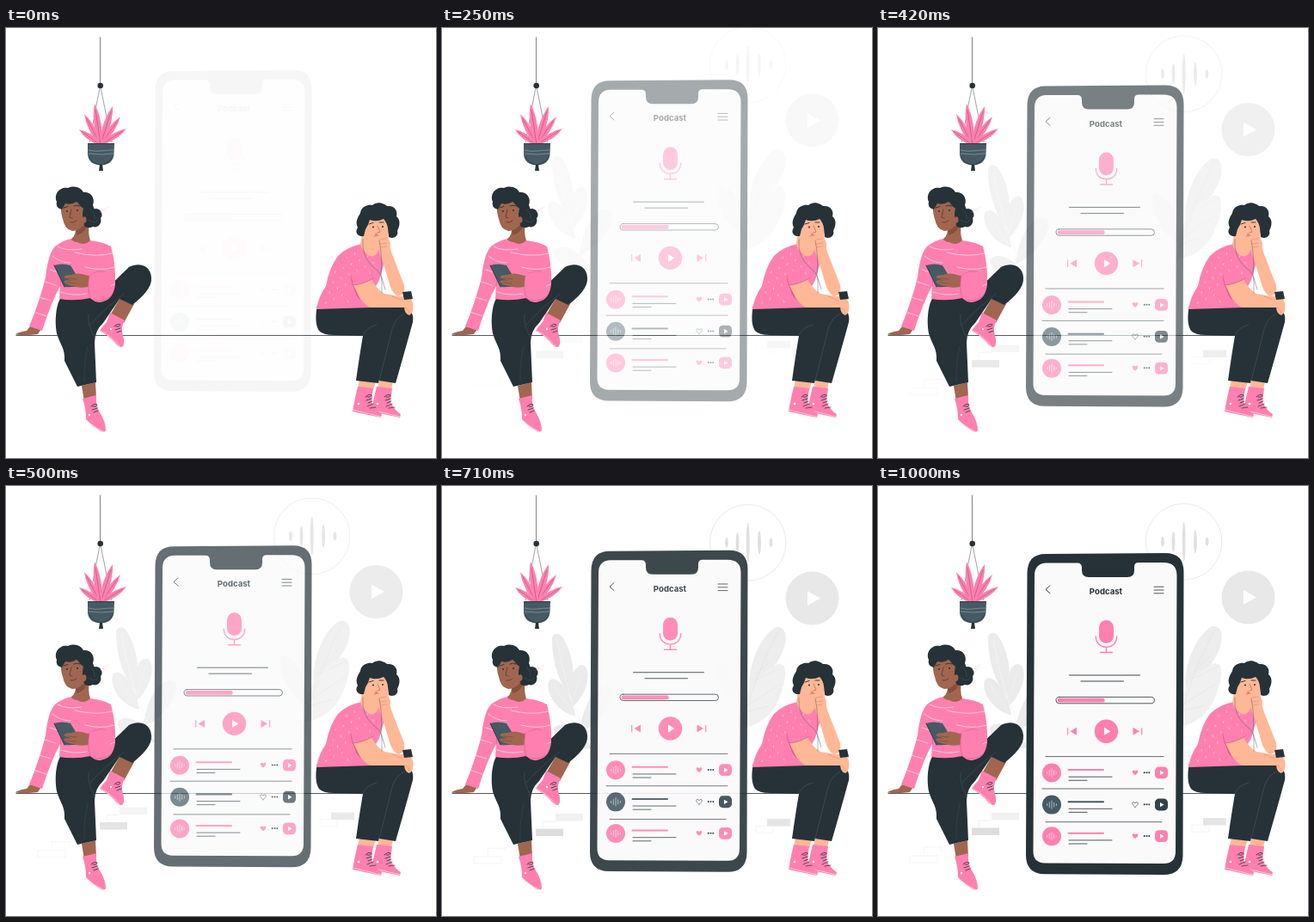
An HTML page with a canvas that plays this animation: 500x500 px, repeating every 1040 ms.

```html
<!DOCTYPE html>
<html lang="en">
<head>
<meta charset="utf-8">
<title>Podcast</title>
<style>
html, body { margin: 0; width: 100%; height: 100%; overflow: hidden; background: #fff; }
canvas { display: block; width: 500px; height: 500px; }
</style>
</head>
<body>
<canvas id="stage"></canvas>
<script>
const SIZE = 500, LOOP = 1040, RATE = 24, DROP = 30;
const PINK = '#ff80b0', DARK = '#263238', SLATE = '#455a64', BROWN = '#a06650',
  SKIN = '#ffb895', PALE = '#ebebeb', WHITE = '#fff', SCREEN = '#fafafa', SHADE = '#d95f8f';
const dpr = window.devicePixelRatio || 1;

function makeCtx(canvas) {
  canvas.width = canvas.height = SIZE * dpr;
  const c = canvas.getContext('2d');
  c.lineCap = c.lineJoin = 'round';
  return c;
}
const stage = makeCtx(document.getElementById('stage'));
const layer = makeCtx(document.createElement('canvas'));
let g = stage;

function fill(d, color) {
  g.fillStyle = color;
  g.fill(new Path2D(d));
}
function line(d, color = DARK, w = 0.8) {
  g.strokeStyle = color;
  g.lineWidth = w;
  g.stroke(new Path2D(d));
}
function oval(x, y, rx, ry, color) {
  g.beginPath();
  g.ellipse(x, y, rx, ry, 0, 0, Math.PI * 2);
  g.fillStyle = color;
  g.fill();
}
const dot = (x, y, r, color) => oval(x, y, r, r, color);
function box(x, y, w, h, r, color, stroke) {
  g.beginPath();
  g.roundRect(x, y, w, h, r);
  if (color) { g.fillStyle = color; g.fill(); }
  if (stroke) { g.strokeStyle = stroke; g.lineWidth = 0.8; g.stroke(); }
}
const tri = (x, y, w, h, color) => fill(`M${x} ${y - h}L${x + w} ${y}L${x} ${y + h}Z`, color);

// Cubic bezier timing, solved by bisection
function bezier(x1, y1, x2, y2) {
  const at = (a, b, s) => 3 * (1 - s) * (1 - s) * s * a + 3 * (1 - s) * s * s * b + s * s * s;
  return t => {
    if (t <= 0) return 0;
    if (t >= 1) return 1;
    let lo = 0, hi = 1;
    for (let i = 0; i < 30; i++) {
      const mid = (lo + hi) / 2;
      if (at(x1, x2, mid) < t) lo = mid; else hi = mid;
    }
    return at(y1, y2, lo);
  };
}
const easeOut = bezier(0, 0, 0.58, 1);
const spring = bezier(0.36, -0.01, 0.5, 1.38);

function drawBack() {
  g.beginPath();
  g.arc(355.7, 64.8, 44.3, 0, Math.PI * 2);
  g.strokeStyle = '#e4e4e4';
  g.lineWidth = 0.8;
  g.stroke();
  [[331, 6], [343.5, 12], [355.7, 23], [369, 13.5], [382.5, 5]]
    .forEach(([x, h]) => oval(x, 64.8, 1.9, h, '#e0e0e0'));
  dot(430.5, 129.5, 31, '#e8e8e8');
  tri(425, 129.5, 15, 8.5, WHITE);

  // Left foliage
  fill('M128 178C127 169 138 167 143 180C152 196 156 220 151 246C138 232 128 205 128 178Z', PALE);
  fill('M151 254C146 230 152 206 164 207C174 211 171 238 152 256Z', PALE);
  fill('M154 266C134 262 120 240 124 226C133 215 151 240 155 266Z', PALE);
  fill('M160 284C164 250 182 226 197 234C203 247 186 274 161 286Z', PALE);
  fill('M174 304C152 309 130 296 130 281C138 270 162 280 174 304Z', PALE);
  line('M134 178Q143 242 176 304', '#f4f4f4', 0.8);
  line('M151 251L163 214M152 263L128 228M161 280L191 241M171 301L135 282', '#f4f4f4', 0.6);

  // Right foliage
  fill('M358 237C354 204 374 169 389 163C402 162 403 180 393 198C383 216 369 229 358 237Z', '#ededed');
  fill('M350 280C344 245 365 217 391 206C402 205 401 223 394 240C386 266 367 278 350 280Z', '#f0f0f0');
  fill('M350 262C326 250 315 219 320 204C337 200 352 233 350 262Z', '#f2f2f2');
  line('M392 167Q368 205 340 306', '#dedede', 0.5);
  line('M366 218L391 193M364 225L397 209M354 255L394 229M352 262L380 255', '#e0e0e0', 0.5);

  // Bricks
  box(109, 397.5, 32, 8.5, 0, '#dedede');
  box(132, 380, 32, 8.5, 0, '#f1f1f1');
  line('M131 389H117V397', '#ededed');
  line('M69 429V438H37V430H69M53 428V420H74M74 420V424', '#f2f2f2');
  box(378, 386, 27, 8.5, 0, '#e5e5e5');
  line('M385 394V402H365V394H377', '#f1f1f1');
}

function wave(x, y) {
  [1, 3, 4.6, 2.4, 1].forEach((h, i) => {
    const u = x - 5.4 + i * 2.7;
    line(`M${u} ${y - h}V${y + h}`, '#ffffffcc', 0.7);
  });
}

function drawRow(y, color, button, liked) {
  dot(202, y, 11, color);
  wave(202, y);
  line(`M221.5 ${y - 3.4}H262`, color, 2);
  line(`M222 ${y + 4.7}H272M222 ${y + 8.8}H243`, DARK, 0.8);
  const heart = `M299 ${y + 2.8}C295 ${y} 295 ${y - 3} 297 ${y - 3}Q298.5 ${y - 3} 299 ${y - 1.6}`
    + `Q299.5 ${y - 3} 301 ${y - 3}C303 ${y - 3} 303 ${y} 299 ${y + 2.8}Z`;
  if (liked) fill(heart, color); else line(heart, color, 0.7);
  [309.7, 312.5, 315.3].forEach(x => dot(x, y - 0.3, 1, DARK));
  box(322, y - 7, 15, 13.8, 4.5, button);
  tri(328, y, 4.5, 2.7, WHITE);
}

function drawPhone() {
  fill('M173.5 101Q174 79 195 79L334 78Q355.5 78 355.5 100L354.5 430Q354 452 332 452L194 451.3Q172 451 172 429Z', DARK);
  fill('M182 104Q182 90 196 89.5H232Q237 89.5 237 95V98Q237 106 245 106H290Q298 106 298 98V94Q298 89 303 89H332Q347.5 89 347.5 104L346 425Q346 439 332 439L194 438.5Q180.5 438 180.5 425Z', SCREEN);

  line('M200 115.8L195 120.3L200 124.8', DARK, 0.9);
  g.fillStyle = DARK;
  g.font = '700 9.6px Inter, sans-serif';
  g.textAlign = 'center';
  g.fillText('Podcast', 265, 126.2);
  line('M321 117.2H332M321 121H332M321 124.8H332', DARK, 0.8);

  box(257, 156, 17, 27, 8.5, PINK);
  line('M253.3 175C253.3 191.5 277.7 191.5 277.7 175M265.5 187.5V193.5M258.5 193.5H272.5', PINK, 1.4);

  line('M222.5 220H304.5M236 227H285.5', DARK, 0.9);
  box(207, 245.4, 114.5, 7.4, 3.7, null, DARK);
  box(208.7, 246.8, 55, 4.8, 2.2, PINK);

  line('M220.7 281.5V289M306.7 281.5V289', PINK, 1.2);
  tri(231, 285.3, -7.5, 4.5, PINK);
  tri(296.5, 285.3, 7.5, 4.5, PINK);
  dot(265.5, 285.2, 13.7, PINK);
  tri(263, 285.2, 7.3, 4.5, WHITE);

  line('M195 314.6H332M191 352H332M195 390.7H330', DARK, 0.7);
  drawRow(333.5, PINK, PINK, true);
  drawRow(370.6, SLATE, '#33434b', false);
  drawRow(407.2, PINK, PINK, true);
}

function frond(x, y, bulge) {
  const bx = 110, by = 136, len = Math.hypot(x - bx, y - by);
  const nx = (by - y) / len * bulge, ny = (x - bx) / len * bulge;
  const at = k => [bx + (x - bx) * k, by + (y - by) * k];
  const [mx, my] = at(0.6);
  fill(`M${bx - 2} ${by}Q${mx - nx} ${my - ny} ${x} ${y}Q${mx + nx} ${my + ny} ${bx + 2} ${by}Z`, PINK);
  line(`M${bx} ${by}L${at(0.85)}`, '#8d4564', 0.5);
}

function drawPlant() {
  line('M109.5 11V65', DARK, 0.6);
  line('M109 69L97 133M110 69L123 133', DARK, 0.45);
  dot(109.7, 67, 3.3, DARK);
  frond(85, 118, 6);
  frond(140, 117, 6);
  frond(91, 100, 6);
  frond(133, 103, 6);
  frond(124, 91, 7);
  frond(103, 88, 7);
  fill('M95 134H126L125.5 147Q124 159 110.5 159.5Q96 159 95 147Z', SLATE);
  line('M95.5 134.5H125.5', DARK, 0.8);
  line('M96 142Q103 144 110 143T125 142M96 146Q111 148 125 146', '#9caab0', 0.6);
  line('M97 150Q101 158 110 159Q120 158 124 150', DARK, 0.6);
  fill('M109 159H112L113 166H108Z', DARK);
}

function laces(x, y) {
  line(`M${x - 4} ${y}Q${x} ${y - 4} ${x + 3} ${y - 2}Q${x + 2} ${y + 1} ${x - 2} ${y}M${x - 3} ${y + 4}L${x + 3} ${y + 2}M${x - 1} ${y + 7}L${x + 4} ${y + 5}`, DARK, 0.8);
}

function drawWoman() {
  // Supporting hand
  fill('M28 347L41 350L37 356Q24 358 11 356.5Q12 354 24 352Z', BROWN);

  // Feet
  fill('M88 416L104 412L105 431L91 434Z', BROWN);
  fill('M89 431L105 427Q104 439 109 447Q116 458 116 468Q114 471 109 468Q98 461 93 455Q93 442 89 431Z', PINK);
  line('M93 455Q101 464 113 469', '#ffd5e4', 0.8);
  laces(103, 440);
  dot(97, 450, 1.2, WHITE);
  fill('M133 313L149 321L137 343L121 334Z', BROWN);
  fill('M121 331L138 340Q133 348 136 358Q139 367 135 371Q131 372 125 364Q118 357 109 352Q112 347 117 342Z', PINK);
  line('M110 352Q121 357 132 370', '#ffd5e4', 0.8);
  laces(130, 347);
  dot(122, 350, 1.2, WHITE);

  // Trousers
  fill('M64 313C56 325 57 350 60 358C63 368 69 373 68 387L83 417L105 412L103 366Q103 352 113 343L132 315L147 322C159 312 170 302 169 290C168 276 155 272 143 278L109 311Z', DARK);
  line('M103 360Q94 344 96 333M98 345Q113 328 137 309', '#45545c', 0.6);
  line('M95 370Q90 392 91 412', '#3a4951', 0.6);

  // Sweater
  fill('M76 245Q87 251 98 247Q114 249 122 254Q128 276 127 298Q125 315 113 318Q105 321 98 314Q80 318 62 315L63 300Q53 318 42 352L27 347Q39 318 46 290Q49 262 57 254Q66 247 76 245Z', PINK);
  line('M54 265Q63 273 75 273M51 281L60 284M45 295L58 299M38 313L52 317M32 330L47 335M80 261Q104 267 124 262M92 278Q111 283 126 278M60 254Q70 260 88 257M64 307Q78 312 94 309M101 300Q114 305 126 298', '#ffd9e7', 0.8);
  line('M63 300L66 279M98 314Q110 321 122 312M96 288Q109 280 116 284', SHADE, 0.7);

  // Neck, head
  fill('M81 230L97 225Q95 239 98 247Q91 254 83 249Q76 248 76 245Q82 241 81 230Z', BROWN);
  fill('M81 233Q90 232 95 226Q93 239 82 241Z', '#874f3e');
  fill('M64 204Q78 196 91 207L94 222Q88 236 77 236Q68 234 66 222Q63 213 64 204Z', BROWN);
  fill('M59 202C55 193 63 184 72 186C81 182 88 187 90 191C99 190 104 198 101 206C103 210 101 211 105 210C112 211 113 219 110 221C112 227 107 233 101 231C95 234 89 231 91 226C88 221 89 214 90 210C86 207 84 203 82 202Q76 206 69 204L65 211Q57 209 59 202Z', DARK);
  oval(91, 223, 2.5, 3.8, BROWN);
  line('M98 211Q104 215 103 222M96 223Q103 229 107 223', '#40525b', 0.6);
  line('M67 209L72 207.5M79 207Q83 205 86 207', DARK, 0.9);
  dot(71, 213, 1, DARK);
  dot(83, 212, 1, DARK);
  line('M76 211L74 220L77 221M75 226Q79 227 82 224', '#54312a', 0.7);
  line('M110 214L119 208M112 211L116 214', '#ffd0df', 0.6);

  // Device and holding hand
  fill('M56 276Q65 273 75 276L89 299Q79 302 68 301Z', SLATE);
  line('M56 276L68 301', '#2b3b43', 1);
  fill('M76 287Q83 284 92 287L99 289L96 301Q85 303 78 300Q70 299 67 295Q69 292 77 294L67 290Q68 287 76 287Z', BROWN);
  line('M72 291L82 292M71 296L81 297', '#754637', 0.6);
  fill('M97 287Q110 281 123 286L120 308Q109 319 98 314Q94 303 97 287Z', PINK);
  line('M97 288Q94 302 98 314', SHADE, 0.7);
}

function manShoe(x) {
  fill(`M${x + 6} 417L${x + 24} 419L${x + 22} 435Q${x + 28} 446 ${x + 34} 449L${x + 33} 453L${x} 446Q${x + 2} 433 ${x + 6} 417Z`, PINK);
  line(`M${x} 444L${x + 33} 452`, '#ffd5e4', 0.8);
  laces(x + 19, 429);
  line(`M${x + 17} 440L${x + 24} 437M${x + 20} 442L${x + 27} 441`, DARK, 0.7);
  dot(x + 7, 437, 1.3, WHITE);
}

function drawMan() {
  fill('M434 409L450 411L448 421L432 420Z', SKIN);
  manShoe(425);
  fill('M411 409L430 411L427 421L409 419Z', SKIN);
  manShoe(403);

  // Trousers
  fill('M430 324H464Q475 329 473 342Q464 375 453 413L434 410Z', DARK);
  fill('M362 322Q358 343 364 352Q368 357 382 357L415 358Q411 381 407 410L433 413L447 350Q450 333 437 324Z', DARK);
  line('M434 410L449 350Q453 337 463 332M415 357Q419 348 431 345', '#43525a', 0.7);

  // Shirt
  fill('M414 248L434 250Q441 260 439 276L434 293L428 304L424 325L361 327Q363 313 372 300Q376 278 386 265Q397 254 414 251Z', PINK);

  // Neck, head
  fill('M414 240L434 244L434 256Q430 269 421 264Q414 259 412 251Z', SKIN);
  fill('M415 224Q427 216 442 223L445 238Q438 251 426 251Q417 248 415 239Z', SKIN);
  fill('M409 232C405 224 411 218 412 215C413 207 422 205 426 206C433 200 441 205 443 207C452 206 456 213 454 219C460 224 457 232 455 236C457 242 450 246 445 243L444 233Q443 226 439 222Q431 226 423 223Q421 230 418 234L416 242C409 243 405 238 409 232Z', DARK);
  line('M422 228L427 226.5M434 226L439 226', DARK, 0.9);
  dot(427, 231.5, 1, DARK);
  dot(438, 231, 1, DARK);
  line('M432 230L435 237L432 238M428 242L433 241', '#b66750', 0.7);
  dot(430.5, 240, 1.4, '#f17b91');

  // Propped arm
  fill('M434 245Q435 239 440 238L444 236Q444 245 447 250Q446 256 449 263L463 299Q465 309 457 312Q451 311 447 301L437 268Q431 256 434 245Z', SKIN);
  line('M435 246L442 245M435 251L443 250M436 255L442 254', '#dc8b6d', 0.6);

  // Resting arm
  fill('M402 293L424 290Q430 303 440 309L458 312Q470 310 473 319Q475 331 469 334Q464 333 463 325L423 325Q410 318 402 293Z', SKIN);
  fill('M461 307L471 306L473 315L463 316Z', DARK);
  line('M464 325Q468 326 469 332M449 312L461 317', '#dc8b6d', 0.6);

  // Sleeve
  fill('M390 264Q409 260 417 278L427 291Q417 298 402 299Q398 286 390 264Z', PINK);
  line('M401 288L403 299Q416 298 427 291', SHADE, 0.8);
  fill('M400 289L404 299L413 318L407 310Z', SHADE);
  for (let i = 0; i < 40; i++) {
    const x = 366 + i * 0.618034 % 1 * 64, y = 260 + i * 1.5;
    const inside = x > 392 - (y - 262) * 0.45 && !(x > 399 && y > 287);
    if (inside) line(`M${x} ${y}l${i % 3 - 1} 2`, '#ffd4e3', 0.7);
  }
  line('M415 246Q413 266 428 279Q436 283 437 294V308M434 247Q438 266 436 287L441 304', '#596168', 0.5);
}

function group(draw, ease, t) {
  const v = ease(t);
  g = layer;
  g.setTransform(1, 0, 0, 1, 0, 0);
  g.clearRect(0, 0, SIZE * dpr, SIZE * dpr);
  g.setTransform(dpr, 0, 0, dpr, 0, DROP * (v - 1) * dpr);
  draw();
  g = stage;
  g.globalAlpha = Math.min(1, Math.max(0, v));
  g.drawImage(layer.canvas, 0, 0, SIZE, SIZE);
  g.globalAlpha = 1;
}

function render(ms) {
  // Steps start on 10 ms marks, so allow a little rounding
  const step = Math.floor(ms % LOOP / 1000 * RATE + 0.13);
  const t = Math.min(1, (step + 0.5) / RATE);
  g = stage;
  g.setTransform(dpr, 0, 0, dpr, 0, 0);
  g.fillStyle = WHITE;
  g.fillRect(0, 0, SIZE, SIZE);
  group(drawBack, spring, t);
  line('M12 357.5H416', DARK, 0.8);
  group(drawPhone, easeOut, t);
  drawPlant();
  drawWoman();
  drawMan();
}

const start = performance.now();
function tick(now) {
  render(Math.max(0, now - start));
  requestAnimationFrame(tick);
}
render(0);
requestAnimationFrame(tick);
</script>
</body>
</html>
```
